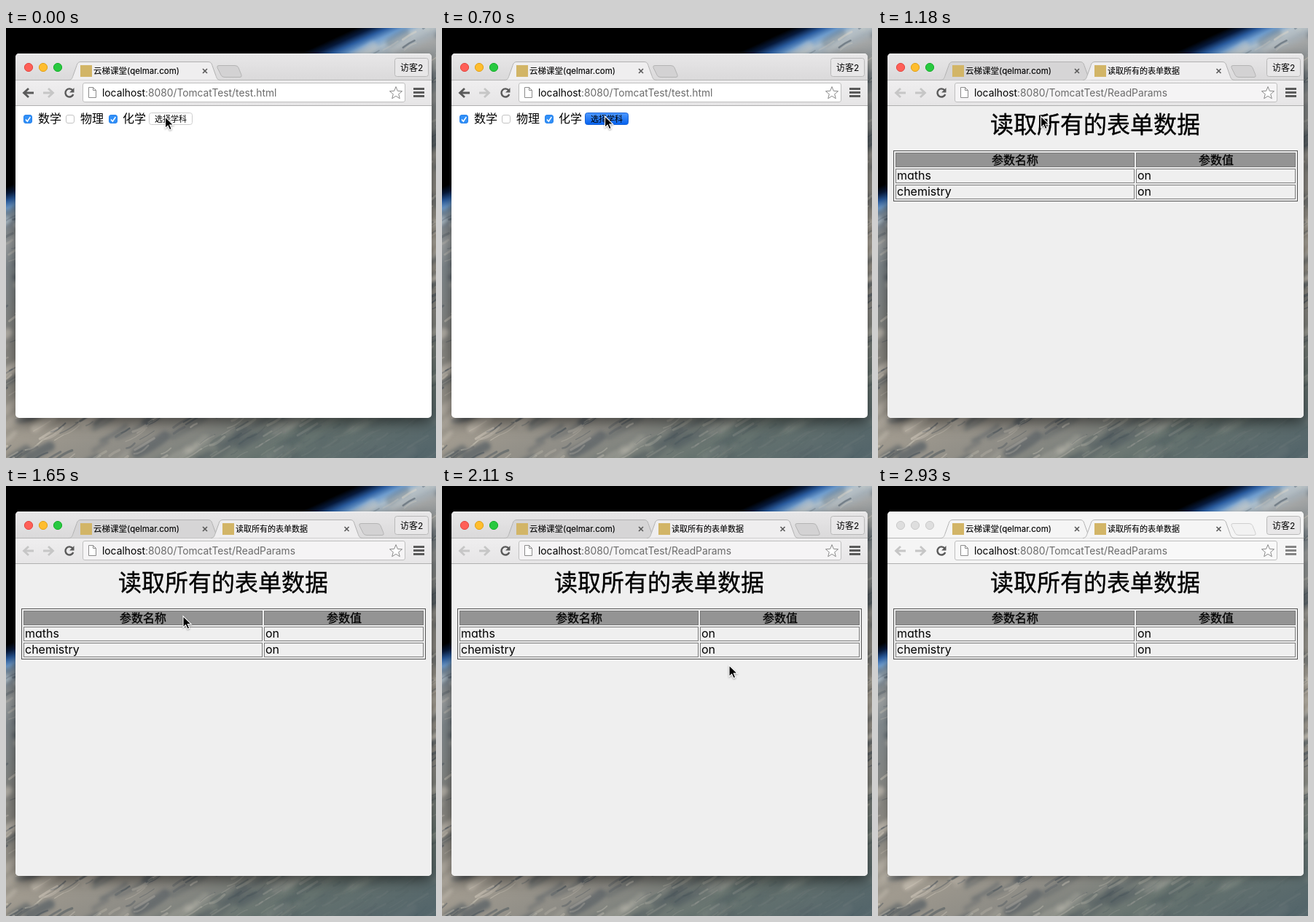
Write an HTML page with a canvas that moves like this. It is 590 by 590 pixels and loops after 2.97 s.

```html
<!DOCTYPE html>
<html lang="zh-CN">
<head>
<meta charset="utf-8">
<title>表单演示</title>
<style>
html, body { margin: 0; width: 100%; height: 100%; overflow: hidden; background: #000 }
canvas, svg { position: absolute; left: 0; top: 0 }
text { font: 12px Inter, "Noto Sans CJK SC", "Noto Sans CJK", sans-serif; fill: #000; white-space: pre }
.tabText { font-size: 11.5px; stroke: #000; stroke-width: .1 }
.named { font-size: 11px }
.url { font-size: 13.8px }
.path { fill: #6b6b6b }
.label { font-size: 16px }
.small { font-size: 11px }
.title { font-size: 32px; stroke: #000; stroke-width: .35 }
.head { font-size: 16px; stroke: #000; stroke-width: .3 }
.cell { font-size: 16px; font-feature-settings: "cv11" }
.mid { text-anchor: middle }
.icon { fill: none; stroke: #5a5a5a }
.dim { stroke: #c6c6c6 }
#frame { filter: drop-shadow(0 7px 9px rgba(0, 0, 0, .5)) }
.result #field { fill: #f5f4f5 }
.inactive #frame { filter: drop-shadow(0 3px 5px rgba(0, 0, 0, .25)) }
.inactive #bar, .inactive #tools, .inactive .tab { fill: #f5f5f5 }
.inactive #field { fill: #f8f8f8 }
.inactive .light { fill: #dedede; stroke: #cacaca }
.inactive #menu { stroke: #858585 }
.inactive .plus { fill: #f2f2f2; stroke: #cfcfcf }
.form .result, .result .form, .loading .loaded, .iconless .loaded,
.result .blank, .loading .named, .result .page { display: none }
.loading .blank, .loading .page, .iconless .page { display: inline }
.form #back { stroke: #5a5a5a }
.pressed #button { fill: url(#blue); stroke: #1763d8 }
</style>
</head>
<body>
<canvas id="sky" width="590" height="590"></canvas>
<svg id="stage" width="590" height="590" viewBox="0 0 590 590"></svg>
<script>
const LOOP = 2970;
const stage = document.getElementById('stage');

function paintSky() {
  const c = document.getElementById('sky').getContext('2d');
  let seed = 11;
  const rnd = () => (seed = seed * 16807 % 2147483647) / 2147483647;
  // Distance measured across the planet's edge.
  const depth = (x, y) => .414 * x + .91 * y;
  const g = c.createLinearGradient(0, 0, 323, 710);
  const stops = [[199, '#000'], [208, '#071a3c'], [217, '#2a5c9f'], [226, '#6f9dce'], [236, '#a9bccb'],
    [260, '#a3a5a5'], [300, '#7e868a'], [400, '#85847f'], [520, '#a09a8f'], [600, '#8c8b85'],
    [680, '#66736f'], [780, '#52646a']];
  for (const [d, color] of stops) g.addColorStop(d / 781, color);
  c.fillStyle = g;
  c.fillRect(0, 0, 590, 590);
  c.lineCap = 'round';

  function clouds(count, width, length, alpha, blur) {
    c.filter = `blur(${blur}px)`;
    for (let i = 0; i < count; i++) {
      const x = rnd() * 630 - 30, y = rnd() * 630 - 10, d = depth(x, y);
      const len = length * (.4 + rnd()), bend = rnd() * .5, pale = rnd() < .55;
      const fade = Math.min(1, Math.max(.12, (720 - d) / 130));
      c.globalAlpha = alpha * (.4 + rnd() * .6) * fade;
      c.strokeStyle = pale ? '#e0d8ca' : '#35434f';
      c.lineWidth = width * (.4 + rnd());
      if (d < 232) continue;
      c.beginPath();
      c.moveTo(x, y);
      c.quadraticCurveTo(x + len * .5, y - len * bend, x + len, y - len * .6);
      c.stroke();
    }
  }
  clouds(450, 10, 42, .5, 2.5);
  clouds(1100, 2.5, 20, .45, .6);
}

const text = (x, y, cls, str) => `<text x="${x}" y="${y}" class="${cls}">${str}</text>`;
const box = (x, y, w, h, fill, stroke, extra = '') =>
  `<rect x="${x}" y="${y}" width="${w}" height="${h}" fill="${fill}" stroke="${stroke}" ${extra}/>`;
const line = (d, width, extra = 'class="icon"') => `<path d="${d}" stroke-width="${width}" ${extra}/>`;
const badge = (x, cls = '') => box(x, 51, 16, 16, '#d2b567', 'none', `class="${cls}"`);
const tab = (x, fill) => `<path class="tab" fill="${fill}" stroke="#b2b2b2"
  d="M${x} 71.5c4 0 5-3 6-6l5-14c1-4 3-5 6-5h174c3 0 5 1 6 5l5 14c1 3 2 6 6 6"/>`;
const plus = x => `<path class="plus" fill="#d3d2d3" stroke="#b4b4b4"
  d="M${x} 51.5h22q4 0 5 3l4 10q1 3-2 3h-21q-4 0-5-3l-5-10q-1-3 2-3z"/>`;
const cross = x => line(`M${x - 3} 56l6 6m0-6l-6 6`, 1.6);
const sheet = (x, y, cls = '') => `<path class="${cls}" fill="#fff" stroke="#8c8c8c"
  d="M${x} ${y}h6l4 4v10h-10zm6 0v4h4"/>`;
const light = (x, fill, stroke) =>
  `<circle class="light" cx="${x}" cy="54" r="5.6" fill="${fill}" stroke="${stroke}"/>`;
const check = (x, on) => box(x + .5, 119.5, 11, 11, on ? '#3290f7' : '#fff', on ? '#2581ec' : '#c4c4c4', 'rx="2.5"')
  + (on ? line(`M${x + 3} 125.5l2.3 2.6 4-6`, 1.6, 'fill="none" stroke="#fff"') : '');
const row = (y, name, value) => box(24.5, y, 327, 19, 'none', '#7c7c7c') + box(354.5, y, 218, 19, 'none', '#7c7c7c')
  + text(26, y + 14.5, 'cell', name) + text(356, y + 14.5, 'cell', value);
const star = Array.from({ length: 10 }, (_, i) => {
  const r = i % 2 ? 3.9 : 9, a = i * Math.PI / 5;
  return `${535 + r * Math.sin(a)} ${89.5 - r * Math.cos(a)}`;
}).join('L');

const gradient = (id, from, to) => `<linearGradient id="${id}" x2="0" y2="1">
  <stop stop-color="${from}"/><stop offset="1" stop-color="${to}"/></linearGradient>`;

function build() {
  stage.innerHTML = `<defs>${gradient('strip', '#e8e7e8', '#dad9da')}${gradient('shade', '#efeeef', '#e6e5e6')}
    ${gradient('blue', '#4f9aff', '#0561ee')}
    <clipPath id="round"><rect x="13" y="35" width="571" height="500" rx="5"/></clipPath></defs>
  <rect id="frame" x="13" y="35" width="571" height="500" rx="5" fill="#fff"/>
  <g clip-path="url(#round)">
    <rect id="bar" x="13" y="35" width="571" height="37" fill="url(#strip)"/>
    <path d="M13 35.5h571" stroke="#f5f5f5"/><path d="M13 71.5h571" stroke="#b5b5b5"/>
    ${light(31, '#ff5f57', '#e2463f')}${light(51, '#ffbd2e', '#e1a116')}${light(71, '#28c940', '#14ae28')}
    <g class="form">${plus(292)}${tab(86, '#efeeef')}</g>
    <g class="result">${plus(487)}${tab(86, '#d6d5d6')}</g>
    ${badge(102)}${text(120, 63, 'tabText', '云梯课堂(qelmar.com)')}${cross(273)}
    <g class="result" id="newTab">${tab(281, '#efeeef')}
      ${badge(297, 'loaded')}${sheet(300.5, 52.5, 'page')}
      ${text(315, 63, 'tabText blank', '无标题')}${text(315, 63, 'tabText named', '读取所有的表单数据')}
      ${cross(467.5)}</g>
    ${box(533.5, 41.5, 46, 25, '#e8e7e8', '#b9b9b9', 'rx="3"')}${text(541, 59, '', '访客2')}
    ${box(13, 72, 571, 34, 'url(#shade)', 'none', 'id="tools"')}<path d="M13 106.5h571" stroke="#b0b0b0"/>
    ${line('M38 89H25m6-6l-6.5 6 6.5 6', 2.8, 'id="back" class="icon dim"')}
    ${line('M51 89h13m-6-6l6.5 6-6.5 6', 2.8, 'class="icon dim"')}
    ${line('M91.5 85.5a5.6 5.6 0 1 0 .8 5.5', 2.4)}<path d="M93.5 82v6.5h-6.5z" fill="#5a5a5a"/>
    ${box(105.5, 75.5, 442, 26, '#fff', '#bfbfbf', 'id="field" rx="2.5"')}${sheet(113.5, 81.5)}
    <text x="132" y="94" class="url">localhost<tspan class="path">:8080/TomcatTest/<tspan
      class="form">test.html</tspan><tspan class="result">ReadParams</tspan></tspan></text>
    <path d="M${star}z" fill="#fff" stroke="#8a8a8a" stroke-linejoin="round"/>
    ${line('M559 83.5h15m-15 5h15m-15 5h15', 2.8, 'id="menu" class="icon"')}
    <g class="form">
      ${check(24, true)}${text(44, 129.5, 'label', '数学')}
      ${check(82, false)}${text(102, 129.5, 'label', '物理')}
      ${check(141, true)}${text(160, 129.5, 'label', '化学')}
      ${box(196.5, 116.5, 59, 16, '#fff', '#cdcdcd', 'id="button" rx="3"')}${text(226, 129, 'small mid', '选择学科')}
    </g>
    <g class="result">
      ${box(13, 107, 571, 428, '#efefef', 'none')}
      ${text(298, 143.5, 'title mid', '读取所有的表单数据')}
      ${box(21.5, 168.5, 554, 69, 'none', '#555')}
      ${box(24.5, 171.5, 327, 19, '#949494', '#777')}${box(354.5, 171.5, 218, 19, '#949494', '#777')}
      ${text(188, 187, 'head mid', '参数名称')}${text(464, 187, 'head mid', '参数值')}
      ${row(193.5, 'maths', 'on')}${row(215.5, 'chemistry', 'on')}
    </g>
  </g>
  <path id="cursor" d="M0 0v15.5l3.6-3.4 2.5 5.6 2.6-1.1-2.4-5.5h5z" stroke="#fff" stroke-width="1.1"
    style="filter:drop-shadow(0 1px 1px rgba(0,0,0,.35))"/>`;
}

// Each entry holds until the next: start time, then the value.
const at = (steps, t) => steps.filter(s => s[0] <= t).pop();
const states = [[0, 'form'], [700, 'form pressed'], [940, 'result loading'], [1060, 'result iconless'],
  [1180, 'result'], [2930, 'result inactive']];
const pointer = [[0, 218.5, 122], [350, 221, 121], [470, 223.5, 121], [1420, 225, 129], [1540, 233, 157],
  [1650, 243, 178.5], [1770, 254, 179], [1880, 266, 179], [2000, 322, 203], [2110, 394, 246],
  [2230, 464, 335], [2350, 518, 470], [2460, 543, 581.5], [2570, 600, 600]];

function draw() {
  const t = performance.now() % LOOP;
  const state = at(states, t)[1], [, x, y] = at(pointer, t);
  stage.setAttribute('class', state);
  document.getElementById('newTab').setAttribute('transform', `translate(0 ${state.includes('loading') ? 3 : 0})`);
  document.getElementById('cursor').setAttribute('transform', `translate(${x} ${y})`);
  requestAnimationFrame(draw);
}

paintSky();
build();
draw();
</script>
</body>
</html>
```
